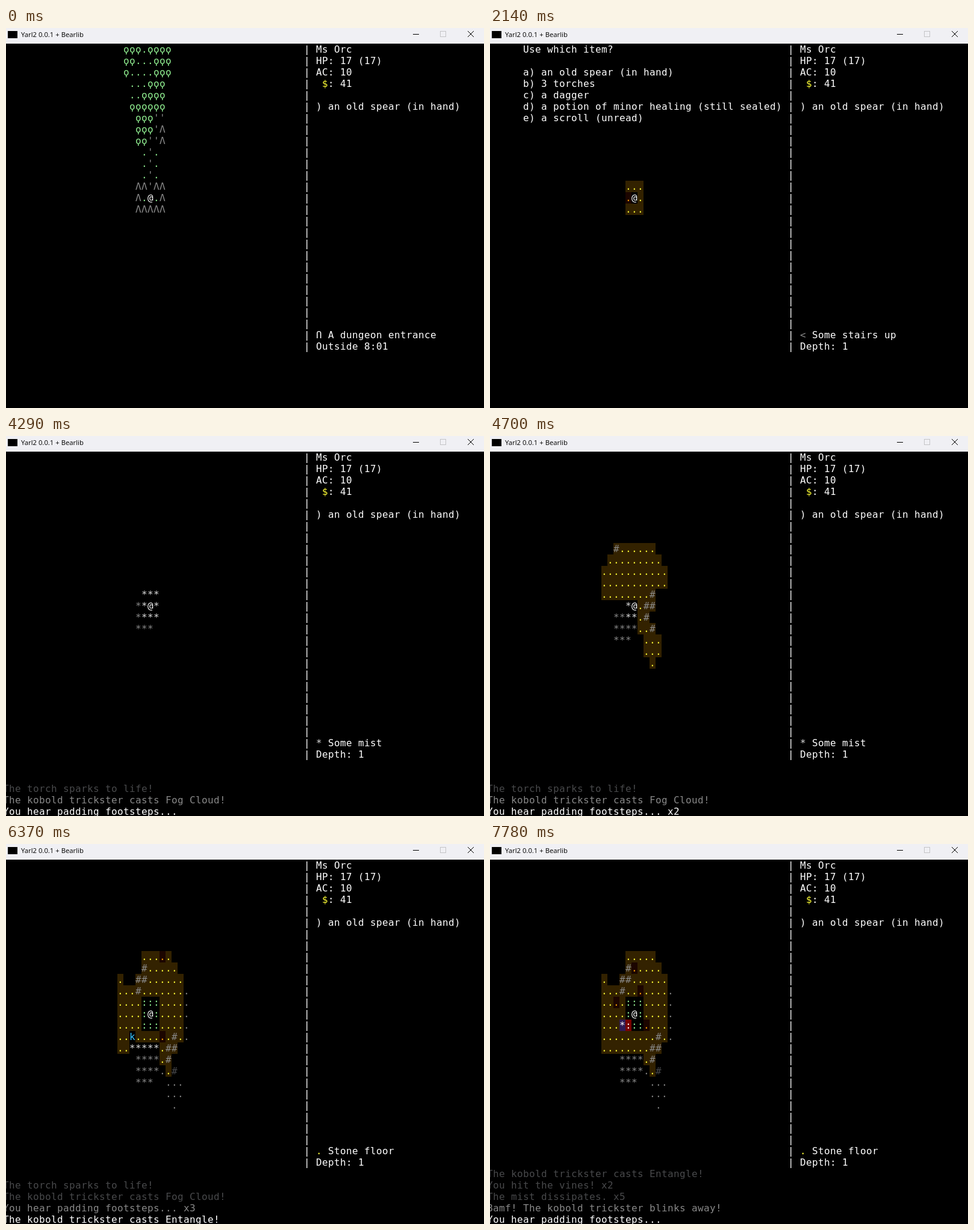
Write an HTML page with a canvas that moves like this. It is 794x632 px and loops after 8000 ms.

```html
<!DOCTYPE html>
<html lang="en">
<head>
<meta charset="utf-8">
<title>Yarl2</title>
<style>
  html, body { margin: 0; width: 100%; height: 100%; overflow: hidden; background: #000; }
  canvas { display: block; }
</style>
</head>
<body>
<canvas id="stage" width="794" height="632"></canvas>
<script>
const ctx = document.getElementById('stage').getContext('2d');
const LOOP = 8000, CELL_W = 10, CELL_H = 19, LEFT = -5, TOP = 26;
const WHITE = '#fff', GREY = '#888', DARK = '#48494b', MIST = '#dcdcdc',
      YELLOW = '#ffff35', GREEN = '#90ee90', LIT = '#332200';

// map code: [glyph, colour, background]
const TILES = {
  '.': ['.', YELLOW, LIT],
  'o': ['.', '#ff9f00', '#1c0500'],
  ',': ['.', GREY],
  'g': ['.', GREEN],
  '#': ['#', GREY, LIT],
  '%': ['#', DARK],
  '*': ['*', MIST],
  'm': ['*', GREY],
  ':': [':', GREEN],
  'k': ['k', '#37c6ff'],
  't': ['ϙ', GREEN],
  "'": ["'", GREY],
  '^': ['Λ', GREY],
  '@': ['@', WHITE],
  'P': ['*', WHITE, '#2f1b55'],
  'H': [':', WHITE, '#780000']
};

// each map: first column, first row, lines
const outside = [20, 0, [
  'tttgtttt', 'ttgggttt', 'tggggttt', ' gggttt', ' ggtttt', ' tttttt',
  "  ttt''", "  ttt'^", "  tt''^", "   g'g", "   g'g", "   g'g",
  "  ^^'^^", '  ^g@g^', '  ^^^^^']];
const stairs = [23, 12, ['...', '.@.', '...']];
const fog = [23, 12, ['***', '*@*', '***']];
const fogEdge = [22, 12, [' ***', 'm*@*', 'm***', 'mmm']];
const leaving = [19, 8, [
  '  #......', ' .........', '...........', '...........', '........#',
  '    *@.##', '  mm**.#', '  mmmm..#', '  mmm  ...', '       ...', '        .']];
const room = [19, 8, [
  '  ##...o.', ' .#......o', '...........', '...........', '...........',
  '..o..@..#', 'k*****.##', '  mmmm.#', '  mmmm,.%', '  mmm  .,,',
  '       ,.,', '        ,']];
const north = [19, 8, [
  '   #.....', '  ##......', '..#........', '...........', '...........',
  '.....@.....', 'k.......#.', '.*****.##', '  mmmm.#', '  mmmm,.%',
  '  mmm  ,,,', '       ,,,', '        ,']];
const vines = [19, 8, [
  '    .....', '    #.....', '.  ##......', '...#.......,', '....:::....,',
  '....:@:....,', '....:::....,', '.........#.,', '..*****.##',
  '   mmmm.#', '   mmmm,.%', '   mmm  ,,,', '        ,,,', '         ,']];

const torch = 'The torch sparks to life!';
const fogCast = 'The kobold trickster casts Fog Cloud!';
const steps = 'You hear padding footsteps...';
const tangle = 'The kobold trickster casts Entangle!';
const hit = 'You hit the vines!';
const onMist = ['*', MIST, 'Some mist'], onFloor = ['.', YELLOW, 'Stone floor'];

const menu = [
  'Use which item?', '',
  'a) an old spear (in hand)',
  'b) 3 torches',
  'c) a dagger',
  'd) a potion of minor healing (still sealed)',
  'e) a scroll (unread)'];

// Each step changes only what it names; "put" lists [code, col, row, ...] over the map.
const timeline = [
  { t: 0, map: outside, under: ['Ո', WHITE, 'A dungeon entrance'], place: 'Outside 8:01', log: [], put: [], menu: [] },
  { t: 1030, map: stairs, under: ['<', GREY, 'Some stairs up'], place: 'Depth: 1' },
  { t: 1460, menu },
  { t: 1610, put: ['o', 24, 14] },
  { t: 2140, put: ['o', 23, 13] },
  { t: 2570, menu: [], put: [] },
  { t: 2700, map: fog, under: onMist, log: [torch, fogCast] },
  { t: 4290, map: fogEdge, log: [torch, fogCast, steps] },
  { t: 4700, map: leaving, log: [torch, fogCast, steps + ' x2'] },
  { t: 4850, put: ['o', 28, 16, 'o', 27, 17] },
  { t: 5400, map: room, under: onFloor, put: [], log: [torch, fogCast, steps + ' x3'] },
  { t: 5800, map: north, put: ['o', 25, 9, 'o', 22, 12] },
  { t: 5930, put: ['o', 27, 10, 'o', 21, 13] },
  { t: 6370, map: vines, put: ['k', 21, 15, 'o', 26, 8, 'o', 26, 15], log: [torch, fogCast, steps + ' x3', tangle] },
  { t: 6520, put: ['k', 21, 15, 'o', 25, 8, 'o', 20, 12, 'o', 29, 13, 'o', 24, 15] },
  { t: 7080, put: ['k', 21, 15, 'o', 29, 11, 'o', 22, 13, 'o', 23, 15] },
  { t: 7360, put: ['k', 22, 14, 'o', 29, 11, 'o', 22, 13, 'o', 23, 15], log: [torch, fogCast, steps + ' x3', tangle, hit] },
  { t: 7630, put: ['k', 22, 14, 'o', 24, 9, 'o', 25, 11, 'o', 21, 12, 'o', 26, 14] },
  { t: 7780, put: ['.', 21, 16, '.', 22, 16, '.', 23, 16, '.', 24, 16, '.', 25, 16,
      'P', 22, 14, 'H', 23, 14, 'o', 24, 9, 'o', 25, 11, 'o', 21, 12, 'o', 26, 14],
    log: [tangle, hit + ' x2', 'The mist dissipates. x5', 'Bamf! The kobold trickster blinks away!', steps] }
];
const scenes = [];
for (const step of timeline) scenes.push({ ...scenes.at(-1), ...step });

function cell(glyph, col, row, colour, back = '#000') {
  const x = LEFT + col * CELL_W, y = TOP + row * CELL_H;
  ctx.fillStyle = back;
  ctx.fillRect(x, y, CELL_W, CELL_H);
  ctx.fillStyle = colour;
  ctx.fillText(glyph, x, y + 15);
}

function write(text, col, row, colour = WHITE) {
  [...text].forEach((ch, i) => { if (ch !== ' ') cell(ch, col + i, row, colour); });
}

function tile(code, col, row) {
  const [glyph, colour, back] = TILES[code];
  cell(glyph, col, row, colour, back);
}

function line(x1, y1, x2, y2) {
  ctx.beginPath();
  ctx.moveTo(x1, y1);
  ctx.lineTo(x2, y2);
  ctx.stroke();
}

function drawTitleBar() {
  ctx.fillStyle = '#f0f0f4';
  ctx.fillRect(0, 0, 794, 26);
  ctx.fillStyle = '#000';
  ctx.fillRect(3, 5, 16, 12);
  ctx.font = '11.3px "Open Sans", "Noto Sans", sans-serif';
  ctx.fillText('Yarl2 0.0.1 + Bearlib', 25, 15);
  ctx.lineWidth = 1;
  ctx.strokeStyle = '#c4c4c6';
  ctx.strokeRect(721.5, 5.5, 9, 9);
  ctx.strokeStyle = '#000';
  line(676, 10.5, 686, 10.5);
  line(767, 5, 777, 15);
  line(777, 5, 767, 15);
}

function drawPanel({ under, place }) {
  for (let row = 0; row < 27; row++) write('|', 50, row);
  ['Ms Orc', 'HP: 17 (17)', 'AC: 10', '  : 41', '', ') an old spear (in hand)']
    .forEach((text, row) => write(text, 52, row));
  write('$', 53, 3, YELLOW);
  write(under[0], 52, 25, under[1]);
  write(under[2], 54, 25);
  write(place, 52, 26);
}

function draw(scene) {
  ctx.fillStyle = '#000';
  ctx.fillRect(0, 0, 794, 632);
  drawTitleBar();
  ctx.font = '16px "DejaVu Sans Mono", monospace';
  const [col, row, lines] = scene.map;
  lines.forEach((text, r) => [...text].forEach((code, c) => {
    if (code !== ' ') tile(code, col + c, row + r);
  }));
  for (let i = 0; i < scene.put.length; i += 3) tile(...scene.put.slice(i, i + 3));
  scene.menu.forEach((text, r) => write(text, 6, r));
  drawPanel(scene);
  // newest message at the bottom, older ones fade
  [...scene.log].reverse().forEach((text, age) =>
    write(text, 0, 31 - age, [WHITE, GREY][age] || DARK));
}

let shown;
function tick() {
  const now = performance.now() % LOOP;
  const scene = scenes.findLast(s => s.t <= now);
  if (scene !== shown) draw(shown = scene);
  requestAnimationFrame(tick);
}
tick();
</script>
</body>
</html>
```
